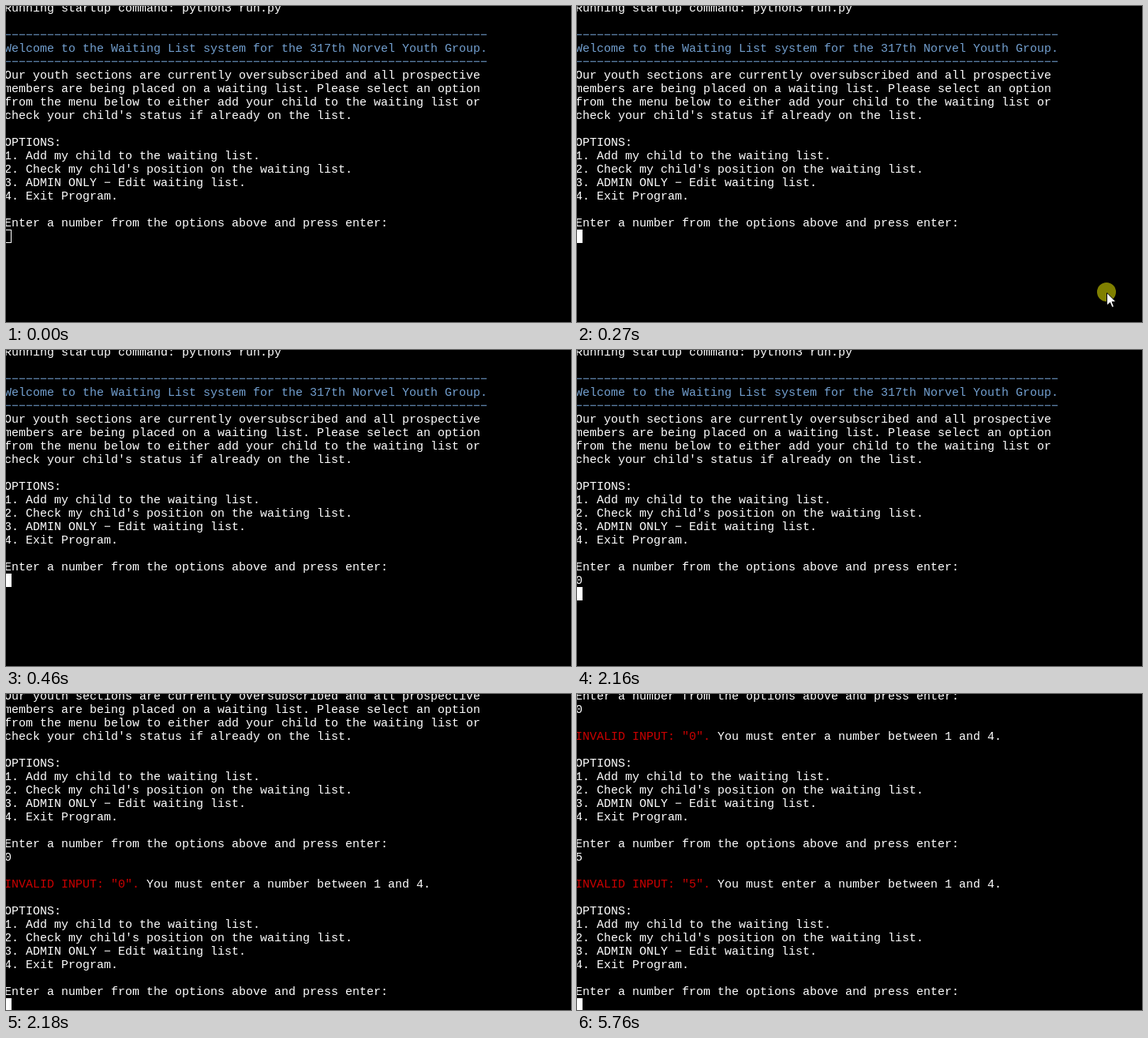
These frames come from a looping animation (716 by 400 pixels, 8 s). An HTML page with a canvas:

```html
<!DOCTYPE html>
<html lang="en">
<head>
<meta charset="utf-8">
<title>Waiting list terminal</title>
<style>
  html, body { margin: 0; height: 100%; overflow: hidden; background: #000; }
  canvas { display: block; }
</style>
</head>
<body>
<canvas id="stage" width="716" height="400"></canvas>
<script>
const ctx = document.getElementById('stage').getContext('2d');
const LOOP = 8000, CELL = 9, ROW = 17, LEFT = -2, TOP = -6;
const WHITE = '#fff', BLUE = '#729fcf', RED = '#cc0000';

// The minus sign gives the wide dash of a typewriter face.
const DASH = '\u2212';
const rule = DASH.repeat(68);
const menu = [
  '',
  'OPTIONS:',
  '1. Add my child to the waiting list.',
  "2. Check my child's position on the waiting list.",
  `3. ADMIN ONLY ${DASH} Edit waiting list.`,
  '4. Exit Program.',
  '',
  'Enter a number from the options above and press enter:'
];
const intro = [
  'Running startup command: python3 run.py',
  '',
  [rule, BLUE],
  ['Welcome to the Waiting List system for the 317th Norvel Youth Group.', BLUE],
  [rule, BLUE],
  'Our youth sections are currently oversubscribed and all prospective',
  'members are being placed on a waiting list. Please select an option',
  'from the menu below to either add your child to the waiting list or',
  "check your child's status if already on the list.",
  ...menu
];
const reject = key => [
  key, '',
  [`INVALID INPUT: "${key}".`, RED, ' You must enter a number between 1 and 4.'],
  ...menu
];

// The last line of each screen holds the cursor.
const afterZero = [...intro, ...reject('0')];
const screens = [
  [0, [...intro, '']],
  [1350, [...intro, '0']],
  [2160, [...intro, '0', '']],
  [2180, [...afterZero, '']],
  [4350, [...afterZero, '5']],
  [5760, [...afterZero, ...reject('5'), '']]
];

function drawText(text, col, row, color) {
  ctx.fillStyle = color;
  ctx.fillText(text, LEFT + col * CELL, TOP + row * ROW + 13);
}

function drawCursor(col, row, focused) {
  const x = LEFT + col * CELL, y = TOP + row * ROW;
  ctx.fillStyle = ctx.strokeStyle = WHITE;
  ctx.lineWidth = 1;
  if (focused) ctx.fillRect(x, y, CELL, ROW);
  else ctx.strokeRect(x + .5, y + .5, CELL - 1, ROW - 1);
}

const arrow = new Path2D('M0 0V16L4 12.5L6.5 18.5L9 17.5L6.5 11.5H11.5Z');

function drawPointer(t) {
  if (t < 60 || t >= 460) return;
  // Slides in from below, rests for the click, slides out again.
  let away = 0;
  if (t < 270) away = ((270 - t) / 210) ** 2;
  else if (t > 320) away = ((t - 320) / 140) ** 2;
  ctx.save();
  ctx.translate(671 + 10 * away, 362 + 51 * away);
  ctx.fillStyle = '#808000';
  ctx.beginPath();
  ctx.arc(0, 0, 12, 0, 2 * Math.PI);
  ctx.fill();
  ctx.translate(.5, 1);
  ctx.fillStyle = WHITE;
  ctx.strokeStyle = '#000';
  ctx.lineWidth = 1;
  ctx.fill(arrow);
  ctx.stroke(arrow);
  ctx.restore();
}

function draw(now) {
  const t = now % LOOP;
  const lines = screens.findLast(([start]) => t >= start)[1];
  const visible = lines.slice(-24);
  ctx.fillStyle = '#000';
  ctx.fillRect(0, 0, 716, 400);
  ctx.font = '15px "Liberation Mono", "Courier New", monospace';
  visible.forEach((line, row) => {
    const [text, color, rest = ''] = [].concat(line);
    drawText(text, 0, row, color || WHITE);
    drawText(rest, text.length, row, WHITE);
  });
  drawCursor(visible.at(-1).length, visible.length - 1, t >= 240);
  drawPointer(t);
}

const begin = performance.now();
function tick() {
  draw(performance.now() - begin);
  requestAnimationFrame(tick);
}
tick();
</script>
</body>
</html>
```
